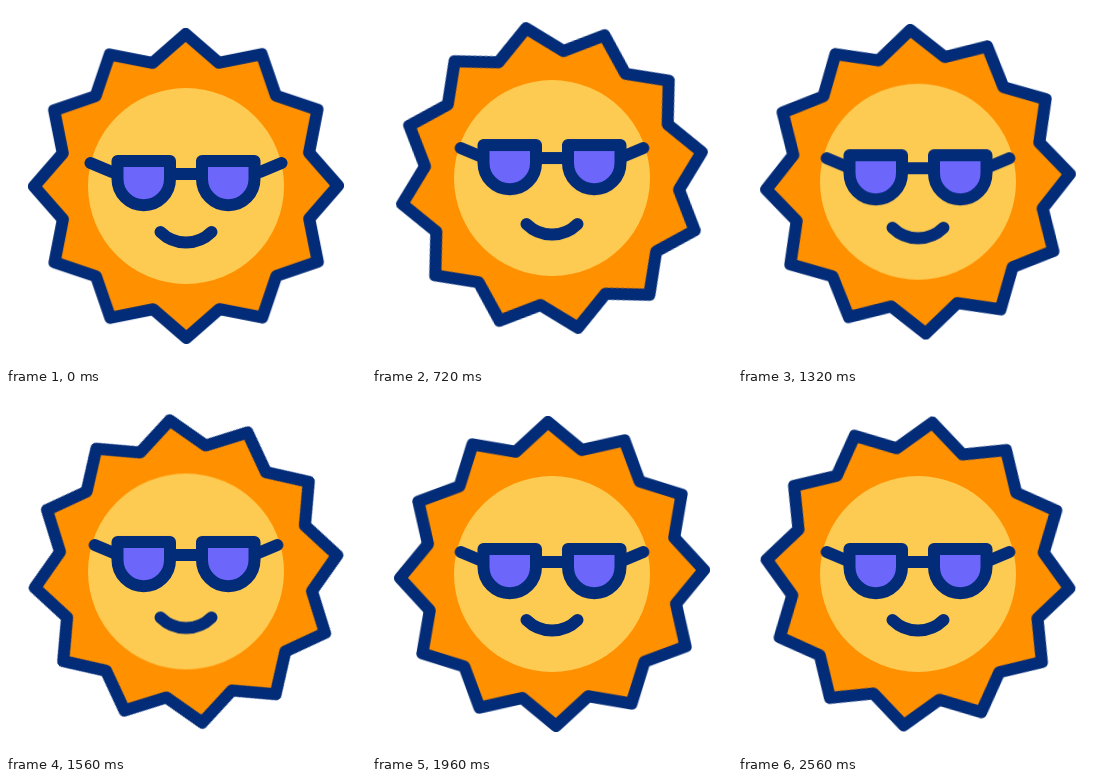
Animation, 360 px wide and 360 px high, one loop 2600 ms. Source, as an HTML page:

```html
<!DOCTYPE html>
<html lang="en">
<head>
<meta charset="utf-8">
<title>Sun with sunglasses</title>
<style>
  html, body { margin: 0; width: 100%; height: 100%; overflow: hidden; background: #fff; }
  svg { display: block; width: 100vw; height: 100vh; }
  .line { stroke: #022b78; stroke-width: 12; stroke-linecap: round; stroke-linejoin: round; fill: none; }
  #rays { fill: #ff9000; transform-origin: 180px 180px; }
  .lens { fill: #6c66fa; }
</style>
</head>
<body>
<svg viewBox="0 0 360 360">
  <g id="sun">
    <path id="rays" class="line"/>
    <circle cx="180" cy="180" r="98" fill="#fecb52"/>
    <path class="line" d="M154.5 226A36.2 36.2 0 0 0 205.5 226"/>
    <g id="glasses" class="line">
      <path id="armL" d="M84.5 157L106 166"/>
      <path id="armR" d="M275.5 157L254 166"/>
      <path d="M164 168H196"/>
      <path class="lens" d="M111.5 155H164V173a26.25 26.25 0 0 1 -52.5 0Z"/>
      <path class="lens" d="M196 155H248.5V173a26.25 26.25 0 0 1 -52.5 0Z"/>
    </g>
  </g>
</svg>
<script>
  const LOOP = 2600;
  const $ = id => document.getElementById(id);

  // Star outline: 12 tips with notches between them
  const points = Array.from({ length: 24 }, (_, i) => {
    const r = i % 2 ? 127.5 : 152;
    const a = i * Math.PI / 12;
    return (180 + r * Math.sin(a)).toFixed(2) + ' ' + (180 - r * Math.cos(a)).toFixed(2);
  });
  $('rays').setAttribute('d', 'M' + points.join('L') + 'Z');

  // steps: [time in ms, transform]
  function play(id, steps, easing) {
    const el = $(id);
    const frames = steps.map(([t, transform]) => ({ offset: t / LOOP, transform, easing }));
    const anim = el.animate(frames, { duration: LOOP, iterations: Infinity });
    anim.startTime = document.timeline.currentTime;
  }

  const EASE = 'cubic-bezier(.364, 0, .636, 1)';
  const move = (x, y) => `translate(${x}px, ${y}px)`;
  const hop = (id, steps) => play(id, steps.map(([t, y]) => [t, move(0, y)]), EASE);

  // Slow crouch, quick spring up, twice; the glasses add their own, settling later
  hop('sun', [[0, 0], [385, 11.5], [625, -9.3], [1120, 5.4], [1380, -5.6], [1720, 0], [LOOP, 0]]);
  hop('glasses', [[0, 0], [385, 11.5], [625, -9.3], [1120, 5.4], [1460, -5.4], [1840, 0], [LOOP, 0]]);

  play('rays', [[0, 'rotate(0deg)'], [LOOP, 'rotate(-360deg)']], 'linear');

  const slide = x => [[0, move(0, 0)], [340, move(0, 0)], [620, move(x, 1)], [LOOP, move(x, 1)]];
  play('armL', slide(4.2), EASE);
  play('armR', slide(-4.2), EASE);
</script>
</body>
</html>
```
